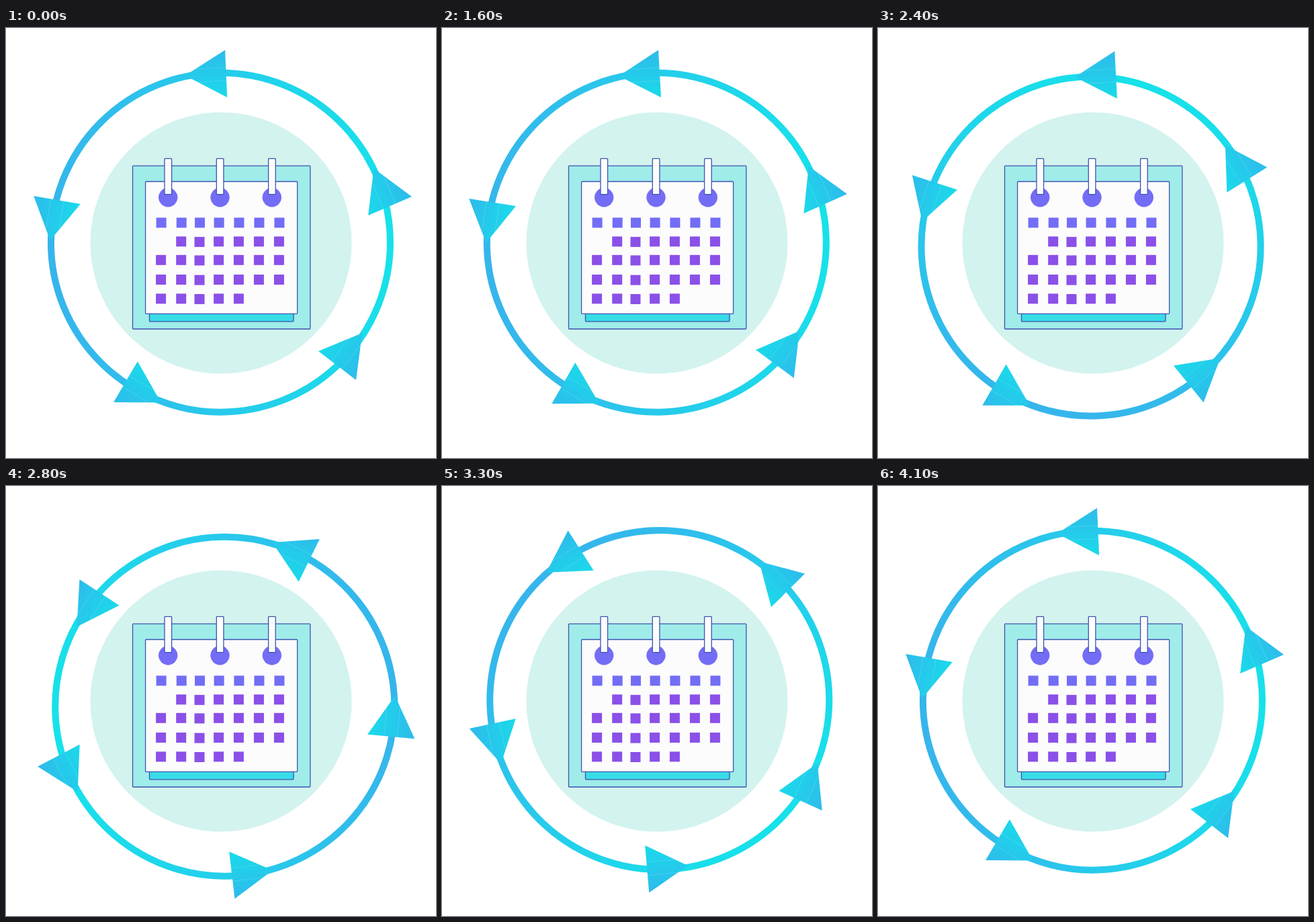
These frames come from a looping animation (640x640 px, 6100 ms). An HTML page:

```html
<!DOCTYPE html>
<html lang="en">
<head>
<meta charset="utf-8">
<title>Calendar cycle</title>
<style>
  html, body { margin: 0; width: 100%; height: 100%; overflow: hidden; background: #fff; }
  svg { display: block; width: 100vw; height: 100vh; }
</style>
</head>
<body>
<svg viewBox="0 0 640 640">
  <defs>
    <linearGradient id="ringFill" gradientUnits="userSpaceOnUse" x1="67" y1="335" x2="572" y2="303">
      <stop offset="0" stop-color="#36b5ec"/>
      <stop offset="1" stop-color="#17e1ea"/>
    </linearGradient>
    <linearGradient id="arrowFill" gradientUnits="userSpaceOnUse" x1="0" y1="35" x2="0" y2="-35">
      <stop offset="0" stop-color="#2ebbeb"/>
      <stop offset="1" stop-color="#1adaea"/>
    </linearGradient>
  </defs>
  <circle cx="320" cy="320" r="194.5" fill="#d3f3ef"/>
  <g id="calendar" stroke="#3d53b0" stroke-width="1.3" stroke-linejoin="round"></g>
  <g id="wheel">
    <circle cx="319.4" cy="319.2" r="252.5" fill="none" stroke="url(#ringFill)" stroke-width="10"/>
  </g>
</svg>
<script>
const LOOP = 6100, STEP = 100;
const SPIN_START = 1475, SPIN_END = 4100;
const PIVOT = "322.4 323.8";

const calendar = document.getElementById("calendar");
const wheel = document.getElementById("wheel");

function add(parent, tag, attrs) {
  const el = document.createElementNS("http://www.w3.org/2000/svg", tag);
  for (const key in attrs) el.setAttribute(key, attrs[key]);
  parent.appendChild(el);
  return el;
}

function box(x, y, width, height, fill, extra) {
  add(calendar, "rect", { x, y, width, height, fill, ...extra });
}

function drawCalendar() {
  box(188.5, 205.2, 264.3, 242.8, "#9fece9", { rx: 1 });
  box(213.5, 415, 214.5, 21.8, "#38dbe6", { rx: 1 });
  box(207.6, 228.5, 226, 196.8, "#fcfcfd", { rx: 1 });

  for (const x of [241.2, 318.5, 395.8]) {
    add(calendar, "circle", { cx: x, cy: 252.2, r: 14.2, fill: "#736df5", stroke: "none" });
    box(x - 5.2, 194.4, 10.6, 53.2, "#fcfcfd", { rx: 0.8 });
  }

  const cols = [230.6, 260.7, 288, 316.6, 346.4, 376.4, 406.4];
  const rows = [289.8, 317.8, 345.3, 374.5, 402.9];
  rows.forEach((y, r) => cols.forEach((x, c) => {
    if ((r === 1 && c === 0) || (r === 4 && c > 4)) return;
    const dx = r ? 0 : 0.5;
    const dy = r && c === 2 ? 0.6 : 0;
    box(x + dx - 7.5, y + dy - 7.5, 15, 15, r ? "#8a50e8" : "#736df5", { stroke: "none" });
  }));
}

// Each arrow: middle of its base, and its heading in degrees.
function drawArrow(x, y, heading) {
  const g = add(wheel, "g", { transform: `translate(${x} ${y}) rotate(${heading})` });
  add(g, "path", { d: "M0 -35.3L61 0L0 35.3Z", fill: "url(#arrowFill)" });
  for (const s of [9, -10.5]) {
    const end = 61 * (1 - Math.abs(s) / 35.3);
    add(g, "path", { d: `M0 ${s}H${end}`, stroke: "#8cecf4", "stroke-width": 0.7, opacity: 0.4 });
  }
}

// Symmetric bezier ease (0.6, 0, 0.4, 1), solved by bisection.
function ease(x) {
  if (x <= 0) return 0;
  if (x >= 1) return 1;
  let lo = 0, hi = 1;
  for (let i = 0; i < 30; i++) {
    const t = (lo + hi) / 2, u = 1 - t;
    if (1.8 * u * u * t + 1.2 * u * t * t + t * t * t < x) lo = t;
    else hi = t;
  }
  return lo * lo * (3 - 2 * lo);
}

function render(ms) {
  const t = Math.floor((ms % LOOP) / STEP) * STEP;
  const turn = 360 * ease((t - SPIN_START) / (SPIN_END - SPIN_START));
  wheel.setAttribute("transform", `rotate(${-turn} ${PIVOT})`);
}

drawCalendar();
drawArrow(327.6, 68, 177.5);
drawArrow(76, 256, 99.7);
drawArrow(178, 526.6, 30.4);
drawArrow(493, 502.4, -52.5);
drawArrow(571.5, 265, -113.3);

const start = performance.now();
function frame() {
  render(performance.now() - start);
  requestAnimationFrame(frame);
}
frame();
</script>
</body>
</html>
```
